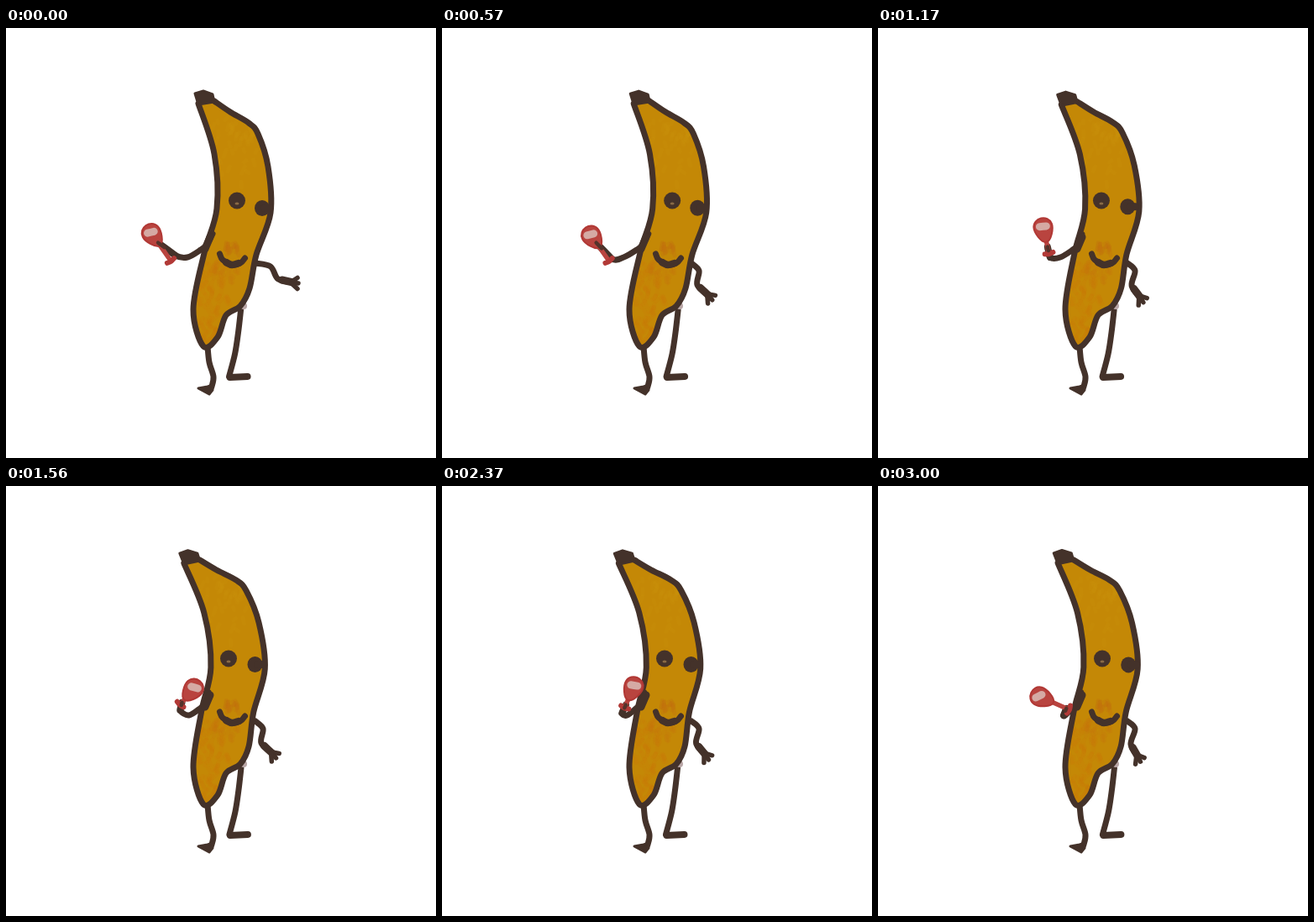
These frames come from a looping animation (512 by 512 pixels, 3030 ms). An HTML page with a canvas:

```html
<!DOCTYPE html>
<html lang="en">
<head>
<meta charset="utf-8">
<title>Dancing banana</title>
<style>
html, body { margin: 0; width: 100%; height: 100%; overflow: hidden; background: #fff; }
canvas { display: block; width: 512px; height: 512px; }
</style>
</head>
<body>
<canvas id="stage" width="512" height="512"></canvas>
<script>
const ctx = document.getElementById('stage').getContext('2d');
const LOOP = 3030, STEP = 30;
const INK = '#44322a', PEEL = '#c48806';

// Key points of the upright peel: down the right side, up the left
const PEEL_EDGE = [
  [248, 87], [267, 100], [289, 113], [300, 126], [312, 165], [315, 220],
  [298, 270], [290, 310], [279, 331], [262, 342], [252, 368], [235, 379],
  [223, 335], [236, 268], [251, 215], [248, 150], [229, 90]
];

const mix = (a, b, k) => a + (b - a) * k;
const mixPoint = (p, q, k) => [mix(p[0], q[0], k), mix(p[1], q[1], k)];

// Smooth 0 to 1 between two times
function ease(t, from, to) {
  const u = Math.max(0, Math.min(1, (t - from) / (to - from)));
  return u * u * (3 - 2 * u);
}

function seeded(seed) {
  return () => (seed = (seed * 16807) % 2147483647) / 2147483647;
}

// Smooth open curve through points
function curve(pts) {
  const at = i => pts[Math.max(0, Math.min(pts.length - 1, i))];
  ctx.beginPath();
  ctx.moveTo(...pts[0]);
  for (let i = 0; i < pts.length - 1; i++) {
    const p = at(i - 1), a = at(i), b = at(i + 1), q = at(i + 2);
    ctx.bezierCurveTo(a[0] + (b[0] - p[0]) / 6, a[1] + (b[1] - p[1]) / 6,
      b[0] - (q[0] - a[0]) / 6, b[1] - (q[1] - a[1]) / 6, b[0], b[1]);
  }
}

function paint(width, color) {
  ctx.lineWidth = width;
  ctx.strokeStyle = color;
  ctx.stroke();
}

function line(pts, width, color = INK) {
  curve(pts);
  paint(width, color);
}

function polygon(pts, color = INK) {
  ctx.beginPath();
  pts.forEach(p => ctx.lineTo(...p));
  ctx.closePath();
  ctx.fillStyle = color;
  ctx.fill();
  paint(3, color);
}

function oval(x, y, rx, ry, color = INK) {
  ctx.beginPath();
  ctx.ellipse(x, y, rx, ry, 0, 0, Math.PI * 2);
  ctx.fillStyle = color;
  ctx.fill();
}

// Cluster of short brush strokes
function dabs(seed, count, [x, y], rx, ry, color) {
  const rnd = seeded(seed);
  for (let i = 0; i < count; i++) {
    const a = rnd() * Math.PI * 2, r = Math.sqrt(rnd());
    const px = x + Math.cos(a) * r * rx, py = y + Math.sin(a) * r * ry;
    line([[px, py], [px + mix(-4, 4, rnd()), py + mix(2, 9, rnd())]], 5, color);
  }
}

// The top leans most, the lower third stays put
function bend(lean) {
  return ([x, y]) => {
    const k = Math.max(0, (330 - y) / 255) ** 1.2;
    const tilt = Math.min(1, k * 2.5) * 0.0028;
    return [x + lean * k, y + lean * (x - 268) * tilt];
  };
}

function drawLegs(t) {
  line([[240, 379], [242, 398], [247, 415], [245, 427]], 7);
  polygon([[229, 429], [240, 427], [246, 425], [246, 431], [242, 436]]);
  ctx.save();
  ctx.translate(0.5 + Math.cos((t - 870) / 2000 * Math.PI * 2), 0);
  line([[280, 336], [277, 362], [273, 388], [266, 415]], 7);
  line([[267, 416], [288, 415]], 8);
  ctx.restore();
  oval(283, 331, 4, 4, '#b9a6a6');
}

function drawRightArm(t) {
  const drop = ease(t, 0, 570);
  const bump = t > 570 && t < 1620 ? Math.sin((t - 570) / 1050 * Math.PI) ** 2 : 0;
  const sway = bump + 1.5 * ease(t, 1800, 3000);
  const elbow = mixPoint([315, 284], [306, 289], drop);
  const wrist = mixPoint([324, 299], [304 - sway * 2, 306 + sway], drop);
  const hand = mixPoint([342, 303], [318 - sway * 5.5, 319 + sway * 2.5], drop);
  line([[297, 280], elbow, wrist, hand], 7);
  line([mixPoint(wrist, hand, 0.25), hand], 9);
  ctx.save();
  ctx.translate(...hand);
  ctx.rotate(0.75 * drop + sway * 0.13);
  for (let i = -1; i <= 1; i++) line([[-2, i], [6 - Math.abs(i), i * 6.5 + 1]], 5.5);
  ctx.restore();
}

function drawBody(lean) {
  const move = bend(lean);
  const edge = PEEL_EDGE.map(move);
  curve(edge);
  ctx.closePath();
  ctx.fillStyle = PEEL;
  ctx.fill();
  ctx.save();
  ctx.clip();
  dabs(7, 40, move([268, 145]), 32, 42, 'rgba(200,143,12,.2)');
  dabs(21, 90, [241, 322], 26, 50, 'rgba(199,116,8,.18)');
  dabs(35, 30, [260, 288], 20, 14, 'rgba(194,114,10,.2)');
  dabs(48, 14, [268, 259], 8, 6, 'rgba(190,108,14,.25)');
  ctx.restore();
  line(edge, 7);
  polygon([[225, 78], [235, 75], [246, 79], [248, 88], [229, 91]].map(move));
}

function drawFace(shift) {
  const left = 275 + shift, right = 305 + shift * 0.85, y = 214.5 + shift * 0.2;
  oval(left, 205.5, 10, 10);
  oval(left, 209, 2.5, 1.6, '#8a6a45');
  oval(right, y, 9, 9.5);
  line([[right + 3, y], [right + 9, y]], 9);
  line([[254.5, 269], [258, 276], [269, 282], [279, 280], [284.5, 274]], 7);
  line([[262, 279], [269, 282], [277, 280]], 8.5);
}

// Forearm, fist and glass all follow the foot of the glass
function drawToast(t, lean) {
  const u = t / 3000;
  const x = 196 + 31 * u ** 1.5;
  const y = 277 - 17 * ease(t, 750, 1560) + 6 * ease(t, 1600, 3000);
  const degrees = -35 + 75 * ease(t, 950, 1560) - 82 * ease(t, 1560, 1880)
    + 65 * ease(t, 1930, 2370) - 89 * ease(t, 2370, 2900);
  const tilt = degrees * Math.PI / 180;
  const length = 30 - degrees * 0.12 + 6 * (1 - ease(t, 0, 1100));
  const grip = 3 + 23 * (1 - ease(t, 600, 1400));
  const hand = [x + Math.sin(tilt) * grip, y - Math.cos(tilt) * grip];
  const wrist = [x + 6 - 12 * u, y - 6 + 13 * ease(t, 0, 1560)];
  const elbow = [216 + 7 * u * u, 273];

  line([bend(lean)([246, 245]), [239, 258], [232, 264], elbow, wrist, hand], 7);
  line([[243, 249], [237, 263]], 9);
  line([wrist, hand], 8);
  ctx.save();
  ctx.translate(x, y);
  ctx.rotate(tilt);
  drawGlass(length, tilt);
  ctx.restore();
  line([hand, mixPoint(hand, wrist, 0.35)], 4.5, '#54332b');
}

function drawGlass(length, tilt) {
  const red = '#b9443f';
  line([[0, 12 - length], [0, 0]], 5.5, red);
  line([[-5, 0], [0, 1], [5, 0]], 6, '#b23a37');
  ctx.beginPath();
  ctx.moveTo(0, 18 - length);
  ctx.bezierCurveTo(-6, 18 - length, -12, 4 - length, -11, -2 - length);
  ctx.bezierCurveTo(-9, -14 - length, 9, -14 - length, 11, -2 - length);
  ctx.bezierCurveTo(12, 4 - length, 6, 18 - length, 0, 18 - length);
  ctx.fillStyle = red;
  ctx.fill();
  paint(2, '#b13835');
  ctx.translate(0, -1 - length);
  ctx.rotate(-tilt * 0.6);
  line([[-4, 0], [4, 0]], 9, '#d5aaa4');
}

function draw(t) {
  const settle = ease(t, 2450, 3000);
  const lean = -20 * ease(t, 400, 1800) + 4 * settle;
  ctx.fillStyle = '#fff';
  ctx.fillRect(0, 0, 512, 512);
  ctx.lineCap = ctx.lineJoin = 'round';
  drawLegs(t);
  drawRightArm(t);
  drawBody(lean);
  drawFace(-10 * ease(t, 400, 1350) + 2 * settle);
  drawToast(t, lean);
}

const start = performance.now();
function tick() {
  const t = Math.floor(((performance.now() - start) % LOOP) / STEP) * STEP;
  draw(t < 2 * STEP ? 0 : t);
  requestAnimationFrame(tick);
}
tick();
</script>
</body>
</html>
```
